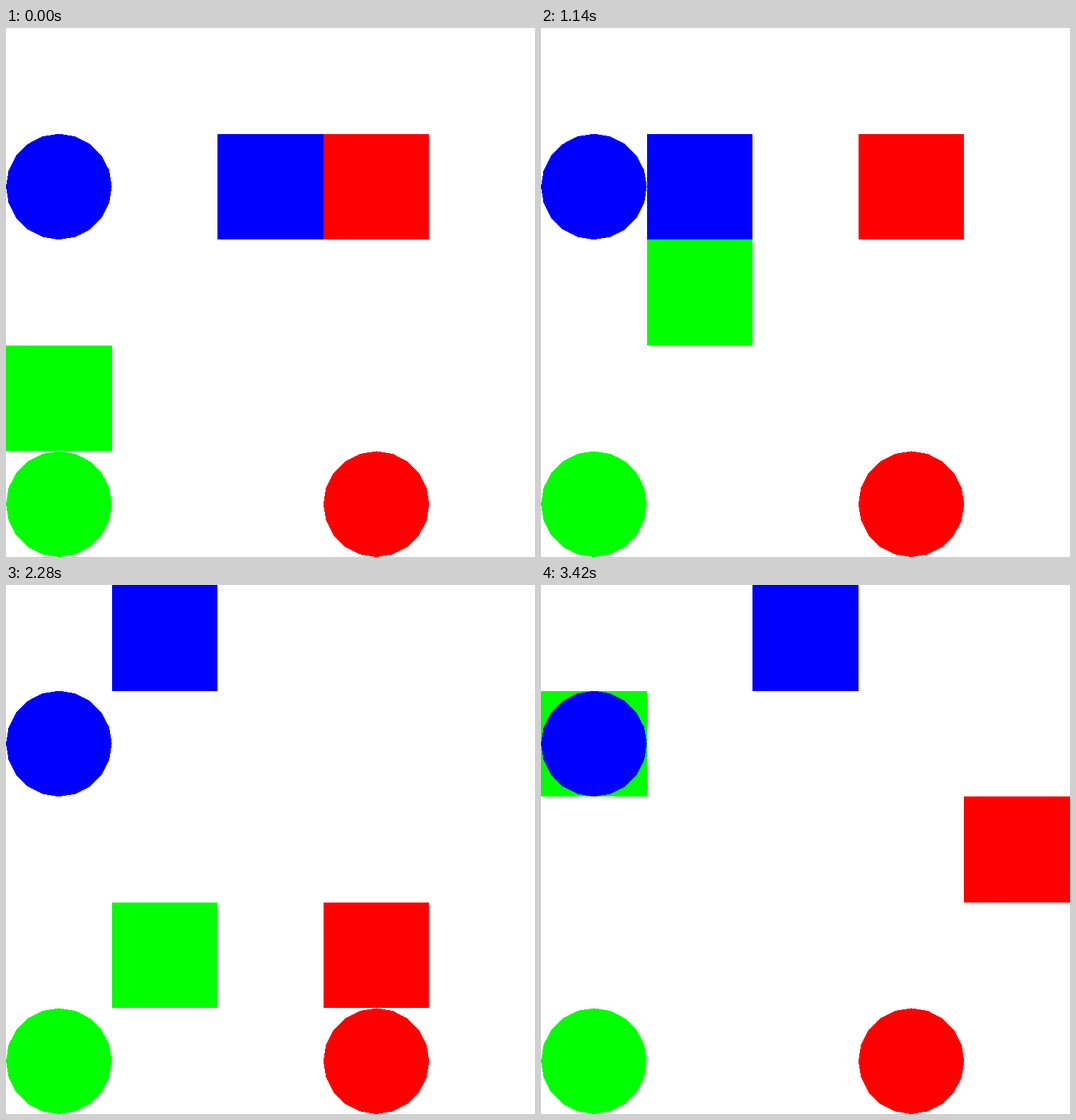
Animation, 748 px wide and 748 px high, one loop 3610 ms. Source, as an HTML page:

```html
<!DOCTYPE html>
<html lang="en">
<head>
<meta charset="utf-8">
<title>Grid walkers</title>
<style>
  html, body { margin: 0; width: 100%; height: 100%; overflow: hidden; background: #fff; }
  svg { display: block; width: 748px; height: 748px; }
</style>
</head>
<body>
<svg id="stage" viewBox="0 0 748 748" shape-rendering="crispEdges"></svg>
<script>
  const CELL = 748 / 5;
  const STEP = 190;

  // One letter per step: up, down, left, right, stay;
  // e and z are the diagonals down-left's opposite (up-right) and up-left's opposite (down-left).
  const DIRS = {
    u: [0, -1], d: [0, 1], l: [-1, 0], r: [1, 0], '.': [0, 0],
    e: [1, -1], z: [-1, 1]
  };
  const walkers = [
    { color: '#f00', start: [3, 1], moves: 'u..rld.d.dduru.d.u', goal: [3, 4] },
    { color: '#0f0', start: [0, 3], moves: '.duu.r.rl..d.uleuz', goal: [0, 4] },
    { color: '#00f', start: [2, 1], moves: 'u..l.dudrl.ul.r..r', goal: [0, 1] }
  ];
  const steps = walkers[0].moves.length + 1;
  const stage = document.getElementById('stage');

  function add(tag, attrs) {
    const el = document.createElementNS('http://www.w3.org/2000/svg', tag);
    for (const key in attrs) el.setAttribute(key, attrs[key]);
    return stage.appendChild(el);
  }

  function disc([col, row]) {
    const points = Array.from({ length: 20 }, (_, i) => {
      const a = i * Math.PI / 10;
      const x = (col + 0.5 + Math.cos(a) / 2) * CELL;
      const y = (row + 0.5 + Math.sin(a) / 2) * CELL;
      return x.toFixed(2) + ',' + y.toFixed(2);
    });
    return points.join(' ');
  }

  function path({ start, moves }) {
    const cells = [start];
    for (const m of moves) {
      const [x, y] = cells[cells.length - 1];
      cells.push([x + DIRS[m][0], y + DIRS[m][1]]);
    }
    return cells;
  }

  for (const w of walkers) {
    w.cells = path(w);
    w.box = add('rect', { fill: w.color });
  }
  // Goals lie above the moving squares.
  for (const w of walkers) add('polygon', { fill: w.color, points: disc(w.goal) });

  function place(box, [col, row]) {
    const x = Math.round(col * CELL), y = Math.round(row * CELL);
    box.setAttribute('x', x);
    box.setAttribute('y', y);
    box.setAttribute('width', Math.round((col + 1) * CELL) - x);
    box.setAttribute('height', Math.round((row + 1) * CELL) - y);
  }

  function draw(time) {
    const step = Math.floor(time / STEP) % steps;
    for (const w of walkers) place(w.box, w.cells[step]);
  }

  const begin = performance.now();
  function tick() {
    draw(performance.now() - begin);
    requestAnimationFrame(tick);
  }
  draw(0);
  requestAnimationFrame(tick);
</script>
</body>
</html>
```
